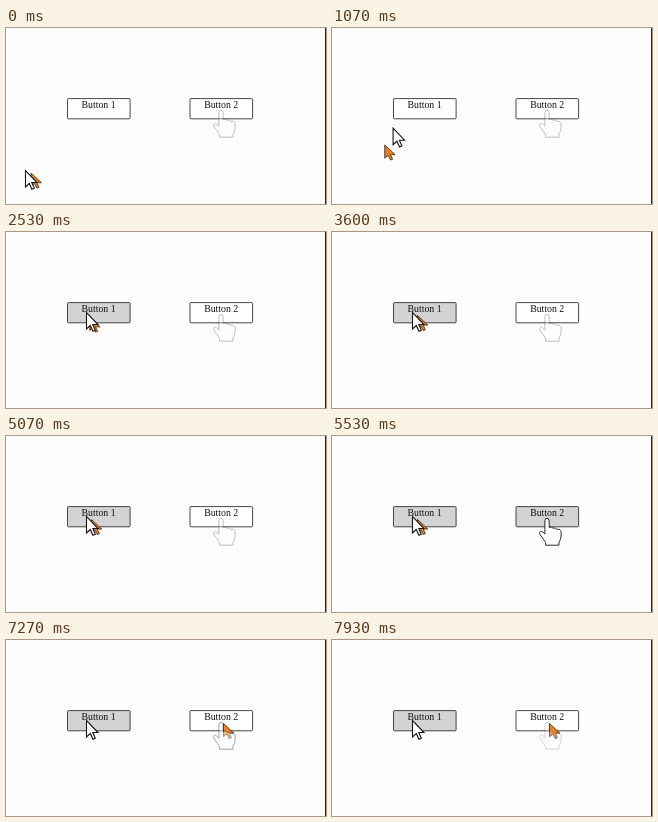
An HTML page that plays this animation: 320x176 px, repeating every 8 s.

```html
<!DOCTYPE html>
<html lang="en">
<head>
<meta charset="utf-8">
<title>Two cursors</title>
<style>
  html, body { margin: 0; width: 100%; height: 100%; overflow: hidden; background: #fdfcfe; }
  svg { display: block; width: 100%; height: 100%; }
  text { font: 9.8px "Liberation Serif", serif; text-anchor: middle; fill: #111; }
  .button { stroke: #333; stroke-width: .9; }
</style>
</head>
<body>
<svg viewBox="0 0 320 176">
  <defs>
    <path id="arrow" d="M0 0V16.5L3.8 13L6.4 18.8L8.8 17.7L6.3 12H11.5Z"/>
  </defs>
  <rect width="320" height="176" fill="#fdfcfe"/>
  <rect x="319" width="1" height="176" fill="#222"/>
  <rect id="button1" class="button" x="61.5" y="70.6" width="62.6" height="20.2" rx="1"/>
  <rect id="button2" class="button" x="184" y="70.6" width="62.6" height="20.2" rx="1"/>
  <text x="92.6" y="79.7">Button 1</text>
  <text x="215.2" y="79.7">Button 2</text>
  <g id="orange">
    <use href="#arrow" transform="scale(.9 .8)" fill="#e8832a" stroke="#4a2a14" stroke-width="1"/>
  </g>
  <path id="hand" fill="#fff" stroke="#151515" stroke-width=".9" stroke-linejoin="round"
    d="M212.9 98V84.6Q213 82.3 215 82.3Q217 82.3 217.1 84.6L217.3 91.5Q219.5 90.3 221.2 92.2
       Q223.6 91.3 225 93.4Q228.8 92.6 229.2 96L229 101Q228.6 104 227 106V109.2H213.6V106.5
       Q211 102.5 208 98.5Q207 96 208.6 95.5Q210.5 95 212.9 98Z"/>
  <use id="white" href="#arrow" fill="#fff" stroke="#151515" stroke-width="1.1"/>
</svg>
<script>
const LOOP = 8000;
const el = id => document.getElementById(id);
const [button1, button2, orange, hand, white] =
  ["button1", "button2", "orange", "hand", "white"].map(el);

const clamp = v => Math.min(1, Math.max(0, v));
const span = (t, from, to) => clamp((t - from) / (to - from));
const easeOut = p => 1 - (1 - p) ** 2;
const mix = (a, b, p) => a + (b - a) * p;

// Linear interpolation through [time, ...values] rows
function track(rows, t) {
  if (t <= rows[0][0]) return rows[0].slice(1);
  for (let i = 1; i < rows.length; i++) {
    const a = rows[i - 1], b = rows[i];
    if (t <= b[0]) {
      const p = span(t, a[0], b[0]);
      return a.slice(1).map((v, k) => mix(v, b[k + 1], p));
    }
  }
  return rows[rows.length - 1].slice(1);
}

const dash = [
  [6130, 85, 83], [6200, 110, 81], [6270, 160, 79], [6340, 207, 77],
  [6400, 224, 79], [6470, 217, 83]
];
const handFade = [
  [5070, .3], [5400, 1], [6130, 1], [6470, .62], [6800, .45], [7200, .45], [7930, .2]
];

function orangeAt(t) {
  if (t > 6130) return track(dash, t);
  if (t < 400) return [24.6, 144.6];
  const p = .96 * easeOut(span(t, 670, 2100)) + .04 * span(t, 2100, 3600);
  return [mix(24, 85, p), mix(145.4, 83, p)];
}

const shade = p => `rgb(${mix(255, 211, p)},${mix(255, 210, p)},${mix(255, 212, p)})`;
const place = (node, [x, y]) =>
  node.setAttribute("transform", `translate(${x + .5} ${y + .5})`);

function draw(t) {
  const p = easeOut(span(t, 670, 1590));
  place(white, [mix(19, 80, p), mix(142, 80, p)]);
  place(orange, orangeAt(t));
  button1.setAttribute("fill", shade(span(t, 1220, 1420)));
  button2.setAttribute("fill", shade(span(t, 5070, 5400) - span(t, 6130, 6450)));
  hand.setAttribute("opacity", track(handFade, t)[0]);
}

const start = performance.now();
function tick() {
  draw((performance.now() - start) % LOOP);
  requestAnimationFrame(tick);
}
tick();
</script>
</body>
</html>
```
